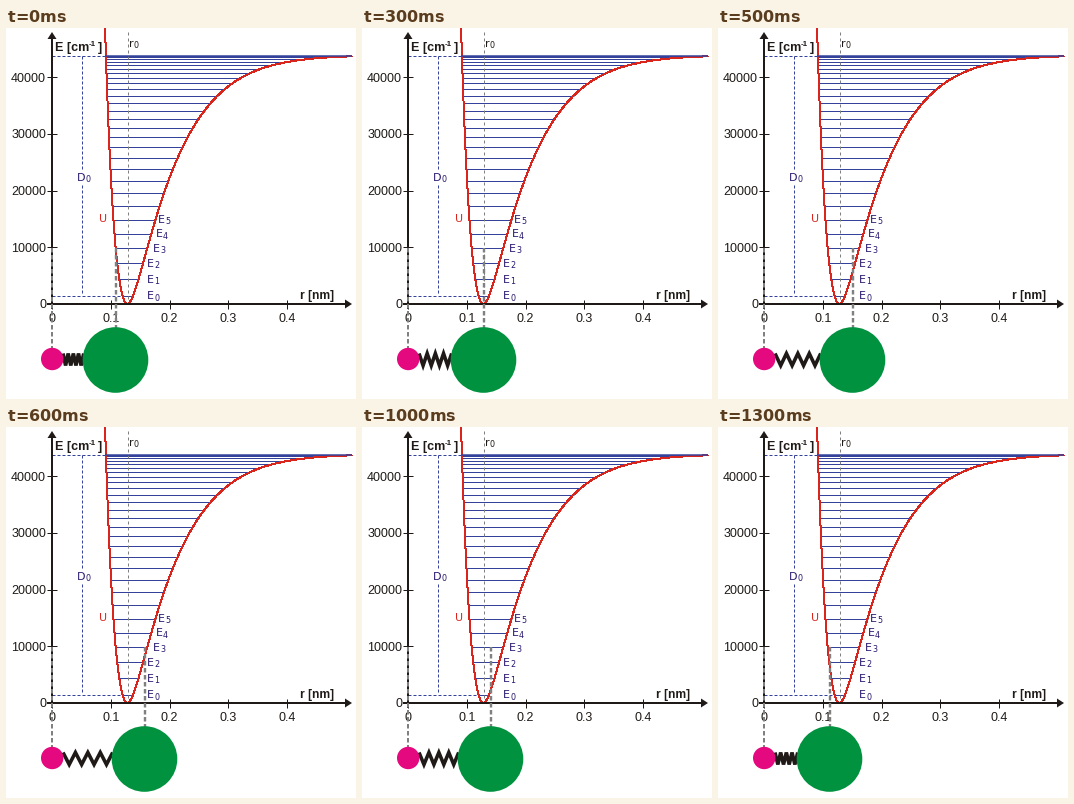
Recreate the animation shown at these times as a matplotlib script. Size 350x371 px, loop 1.4 s.

```python
import numpy as np
import matplotlib.pyplot as plt
from matplotlib.animation import FuncAnimation
from matplotlib.patches import Circle, Polygon

W, H, DPI = 350, 371, 100
PX = 72 / DPI
BLACK, NAVY, BLUE = "#1f1a17", "#28166f", "#34429c"
RED, GREEN, PINK, GRAY = "#da251d", "#00923f", "#e5097f", "#808080"

X0, Y0 = 46, 276            # origin of the axes
NM, CM = 588, 0.00567       # pixels per nm and per cm^-1
R_EQ, DEPTH = 121.3, 249    # well bottom and depth in pixels
OMEGA, ANHARM = 2990, 50.9  # vibrational constants in cm^-1

fig = plt.figure(figsize=(W / DPI, H / DPI), dpi=DPI, facecolor="white")
ax = fig.add_axes([0, 0, 1, 1])
ax.set_xlim(0, W)
ax.set_ylim(H, 0)
ax.axis("off")


def line(xs, ys, color=BLACK, width=1.0, dash=None, z=2, smooth=True):
    style = (0, [d / width for d in dash]) if dash else "-"
    return ax.plot(xs, ys, color=color, lw=width * PX, ls=style, zorder=z,
                   solid_capstyle="butt", dash_capstyle="butt",
                   solid_joinstyle="miter", antialiased=smooth)[0]


def label(x, y, s, size=12.5, color=BLACK, ha="left", font="Liberation Sans",
          weight="normal"):
    ax.text(x, y, s, fontsize=size * PX, color=color, ha=ha,
            va="center_baseline", family=font, weight=weight, zorder=6)


def subscripted(x, y, letter, sub, color=NAVY, step=7.5):
    label(x, y, letter, 11, color, font="DejaVu Sans")
    label(x + step, y + 2, sub, 8, color, font="DejaVu Sans")


def potential(x):
    """Morse-like well, stiffer near its bottom."""
    u = x - R_EQ
    d = np.abs(u)
    a = np.where(u < 0, 0.0315 + 0.005 * np.exp(-d / 12),
                 0.0265 + 0.01 * np.exp(-d / 35))
    return Y0 - DEPTH * (1 - np.exp(-a * u)) ** 2


def level(n):
    v = n + 0.5
    return Y0 - CM * (OMEGA * v - ANHARM * v * v)


# Potential curve and vibrational levels
left = np.linspace(97.5, R_EQ, 200)
right = np.linspace(R_EQ, 346, 600)
curve = np.concatenate([left, right])
line(curve, potential(curve), RED, 1, z=4, smooth=False)

for n in range(28):
    y = level(n)
    x1 = np.interp(y, potential(left), left)
    x2 = np.interp(-y, -potential(right), right)
    y = np.floor(y - 0.45) + 0.5
    line([x1, x2], [y, y], BLUE)
line([99, 346], [27.5, 27.5], BLUE, 1.5, z=5)
for n in range(6):
    subscripted(141 if n < 3 else 139.5 + 2.5 * n, level(n) - 0.5, "E", str(n))

# Dashed guides
line([X0, 99], [27.5, 27.5], BLUE, 1, (3, 2))
line([X0, 115], [267.5, 267.5], BLUE, 1, (3, 2))
line([75.5, 75.5], [28, 142], BLUE, 1, (3, 2))
line([75.5, 75.5], [157, 267], BLUE, 1, (3, 2))
line([121.5, 121.5], [4, Y0], GRAY, 1, (3, 3))

# Axes
line([X0, X0], [9, 281], width=2, z=5)
line([41, 341], [Y0, Y0], width=2, z=5)
for tip in ([(46, 4), (41.5, 11), (50.5, 11)],
            [(346, 276), (339, 271.5), (339, 280.5)]):
    ax.add_patch(Polygon(tip, color=BLACK, lw=0, zorder=5))
for k in range(5):
    y = Y0 - k * 10000 * CM
    x = X0 + k * 0.1 * NM
    line([41, 51], [y, y], z=5)
    line([x, x], [272, 281], z=5)
    label(40, y, str(k * 10000), ha="right")
    label(x, 289, f"{k / 10:g}", ha="center")

label(49, 19, "E [cm", 12.5, weight="bold")
label(82.5, 15, "-1", 8, weight="bold")
label(92, 19, "]", 12.5, weight="bold")
label(293.5, 267, "r [nm]", 12, weight="bold")
subscripted(123.5, 15, "r", "0", BLACK, 4.5)
subscripted(71, 149, "D", "0", step=8.5)
label(92.5, 190, "U", 11, RED, font="DejaVu Sans")

# Vibrating molecule
FRAMES, COILS = 14, 4
BALL_Y, BALL_R, SPRING_X = 332, 32.8, 57
turns = np.arange(2 * COILS + 1)
spring_y = 331.5 - 6 * (-1.0) ** turns

line([X0, X0], [220, 320], GRAY, 2, (4.5, 2.5), z=7)
ax.add_patch(Circle((46.2, 331), 11.2, color=PINK, lw=0, zorder=9))
ball = ax.add_patch(Circle((0, BALL_Y), BALL_R, color=GREEN, lw=0, zorder=9))
drop = line([0, 0], [220, 300], GRAY, 2.4, (4.5, 2.5), z=7)
spring = line([0], [0], BLACK, 3.6, z=8)


def update(i):
    x = np.floor(125 - 15.5 * np.cos(2 * np.pi * i / FRAMES)) + 0.5
    ball.center = (x, BALL_Y)
    drop.set_xdata([x, x])
    spring.set_data(np.linspace(SPRING_X, x - BALL_R + 1, len(turns)), spring_y)
    return ball, drop, spring


anim = FuncAnimation(fig, update, frames=FRAMES, interval=100, repeat=True,
                     repeat_delay=0, blit=False)
plt.show()
```
